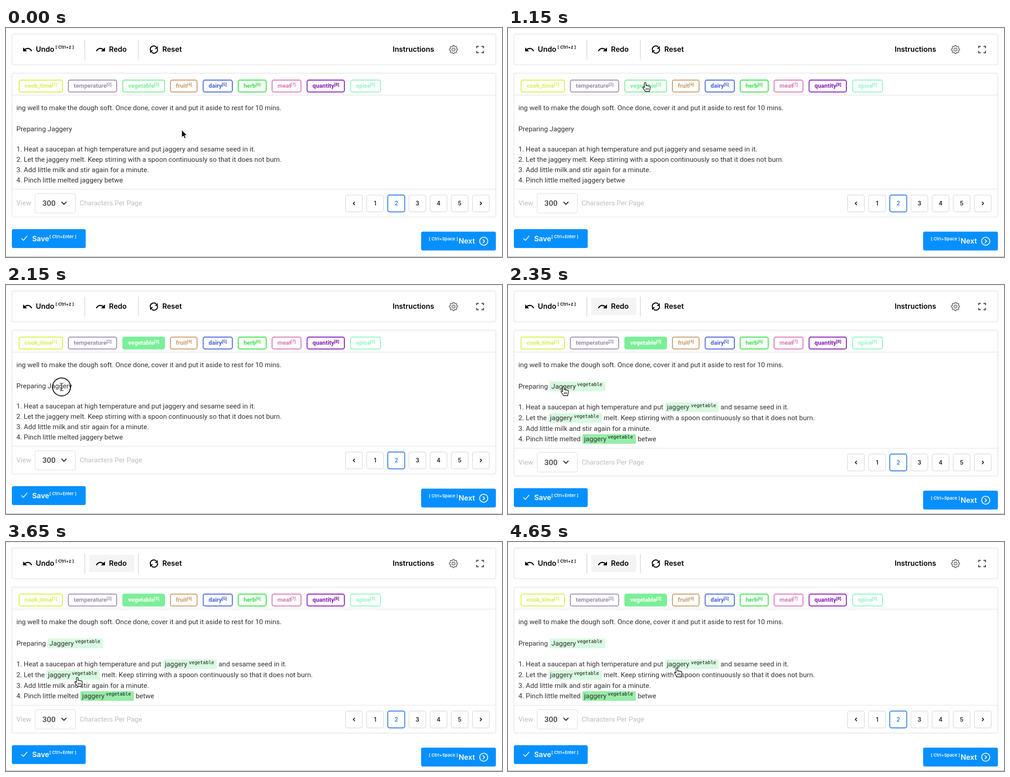
Write an HTML page that moves like this. It is 1098x510 px and loops after 4880 ms.

```html
<!DOCTYPE html>
<html lang="en">
<head>
<meta charset="utf-8">
<title>Text labelling</title>
<style>
  html, body { margin: 0; width: 100%; height: 100%; overflow: hidden; background: #fff; }
  svg { display: block; width: 1098px; height: 510px; }
  text { white-space: pre; }
  .ui { font: 600 15.9px Inter, sans-serif; }
  .key { font: 600 9.6px Inter, sans-serif; }
  .page { font: 600 12.5px Inter, sans-serif; text-anchor: middle; }
  .body { font: 400 15.21px Roboto, sans-serif; fill: #333; }
  .tag { font: 700 13.15px Roboto, sans-serif; }
  .index { font: 700 9.9px Roboto, sans-serif; }
  .mark { font: 400 10.3px "DejaVu Sans Mono", monospace; fill: #111; }
  .size { font: 500 17.2px Roboto, sans-serif; fill: #444; }
  .muted { fill: #bdbdbd; }
  .frame { fill: none; stroke: #d9d9d9; }
  .line { fill: none; stroke-linecap: round; stroke-linejoin: round; }
</style>
</head>
<body>
<svg id="stage" viewBox="0 0 1098 510">
  <path d="M0 .5H1098" stroke="#e6e6e6"/>
  <path d="M0 509.5H1098" stroke="#a8a8a8"/>

  <g id="toolbar">
    <rect class="frame" x="13" y="13.5" width="1071.5" height="68.5" rx="3"/>
    <rect id="redoBg" x="184" y="28.5" width="100" height="38.5" rx="4" fill="#f4f4f4"/>
    <path d="M174.5 26V70M293 26V70" stroke="#c4c4c4"/>
    <path id="undoIcon" transform="translate(36 36.5) scale(.97)" d="M12.5 8c-2.65 0-5.05.99-6.9 2.6L2 7v9h9l-3.62-3.62c1.39-1.16 3.16-1.88 5.12-1.88 3.54 0 6.55 2.31 7.6 5.5l2.37-.78C21.08 11.03 17.15 8 12.5 8z"/>
    <use href="#undoIcon" transform="translate(257 0) scale(-1 1)"/>
    <g id="resetIcon">
      <path id="halfLoop" d="M319.6 49.5A7.8 7.8 0 0 1 332.6 42.2" fill="none" stroke="#000" stroke-width="2.2"/>
      <path id="loopTip" d="M335.8 40V46.6H329.2z"/>
      <use href="#halfLoop" transform="rotate(180 327.4 48)"/>
      <use href="#loopTip" transform="rotate(180 327.4 48)"/>
    </g>
    <g id="gear" class="line" stroke="#6a6a6a" stroke-width="1.6">
      <path id="gearEdge"/>
      <circle cx="990.6" cy="48" r="3.3"/>
    </g>
    <path d="M1042 45V41H1046.5M1052.5 41H1057V45M1057 51V55H1052.5M1046.5 55H1042V51" fill="none" stroke="#555" stroke-width="2.3"/>
    <text class="ui" x="66" y="53.3">Undo</text>
    <text class="key" x="109.5" y="46.2">[ Ctrl+z ]</text>
    <text class="ui" x="228" y="53.3">Redo</text>
    <text class="ui" x="346" y="53.3">Reset</text>
    <text class="ui" x="856" y="53.3">Instructions</text>
  </g>

  <rect id="panel" class="frame" x="13" y="100.5" width="1071.5" height="320.5" rx="3"/>
  <path d="M13 149.5H1084" stroke="#e0e0e0"/>
  <g id="tags"></g>
  <g id="plain"></g>
  <g id="marked"></g>

  <g id="footer">
    <path d="M13 359H1084" stroke="#e0e0e0"/>
    <text class="body muted" style="fill:#bdbdbd" x="23" y="395.4">View</text>
    <rect class="frame" x="64.5" y="369" width="89" height="43" rx="3"/>
    <text class="size" x="80.5" y="396">300</text>
    <path class="line" d="M123.5 387.8L128.3 392.6 133.1 387.8" stroke="#444" stroke-width="2.5"/>
    <text class="body muted" style="fill:#bdbdbd" x="163" y="395.4">Characters Per Page</text>
    <g id="pages"></g>
    <g fill="#fff">
      <rect x="13" y="448" width="163.5" height="42" rx="4" fill="#0690ff"/>
      <path class="line" d="M34.5 469L38.5 473 46.5 463.5" stroke="#fff" stroke-width="1.7"/>
      <text class="ui" x="58" y="474.7">Save</text>
      <text class="key" x="96" y="467.8">[ Ctrl+Enter ]</text>
      <rect x="919" y="453.5" width="165.5" height="42" rx="4" fill="#0690ff"/>
      <text class="key" x="936" y="473.3">[ Ctrl+Space ]</text>
      <text class="ui" x="1002" y="480.2">Next</text>
      <g class="line" stroke="#fff" stroke-width="1.8">
        <circle cx="1057.5" cy="474.8" r="9"/>
        <path d="M1056 471.3L1059.5 474.8 1056 478.3"/>
      </g>
    </g>
  </g>

  <g id="cursor">
    <circle id="ring" r="20" fill="none" stroke="#111" stroke-width="1.9"/>
    <path id="arrow" d="M0 0V16.5L3.8 13 6.3 19 9 17.9 6.5 12H11.5z" fill="#000" stroke="#fff"/>
    <g id="beam" fill="none" stroke-linecap="round">
      <path d="M-3.5-8.5Q0-8.5 0-6Q0-8.5 3.5-8.5M0-6V6M-3.5 8.5Q0 8.5 0 6Q0 8.5 3.5 8.5M-2 3H2" stroke="#fff" stroke-width="2.6" opacity=".7"/>
      <path d="M-3.5-8.5Q0-8.5 0-6Q0-8.5 3.5-8.5M0-6V6M-3.5 8.5Q0 8.5 0 6Q0 8.5 3.5 8.5M-2 3H2" stroke="#111" stroke-width="1.2"/>
    </g>
    <g id="hand" stroke="#111" stroke-width="1.3" stroke-linejoin="round">
      <path d="M-2.1 10.8V1.1a1.8 1.8 0 0 1 3.6 0V6.6a1.8 1.5 0 0 1 3.4.6a1.7 1.5 0 0 1 3.2.7a1.5 1.4 0 0 1 2.6 1.2V13q0 2.2-1.4 4v2.5H.1q-.4-1.6-2.4-3.8T-5.6 10.4q-.1-1.6 1.3-1.4t2.2 1.8z" fill="#fff"/>
      <path d="M1.6 11.5v4.5m2.7-4.5v4.5m2.7-4.5v4.5" fill="none" stroke-width="1.1"/>
    </g>
  </g>
</svg>
<script>
const LOOP = 4880, PICK = 1300, APPLY = 2250, GROW = 4.5;
const $ = id => document.getElementById(id);

function add(parent, name, attrs, content) {
  const el = document.createElementNS("http://www.w3.org/2000/svg", name);
  for (const key in attrs) el.setAttribute(key, attrs[key]);
  if (content) el.textContent = content;
  return parent.appendChild(el);
}
const write = (parent, cls, x, y, content, attrs) =>
  add(parent, "text", { class: cls, x, y, ...attrs }, content);

// Label buttons: name, left, right, index offset, colour
const tags = [
  ["cook_time", 28, 126, 102, "#d3f24b"],
  ["temperature", 137, 246, 222.5, "#9c8fb0"],
  ["vegetable", 257.5, 352, 328, "#7bef98"],
  ["fruit", 363, 424, 400.5, "#c89b68"],
  ["dairy", 435.5, 502, 477.5, "#4463d8"],
  ["herb", 513, 577, 552.5, "#3ae04c"],
  ["meat", 588, 654, 630, "#d777b4"],
  ["quantity", 665.5, 750, 726.5, "#8219b5"],
  ["spice", 762, 830, 806, "#90f6c3"]
].map(([name, left, right, supX, color], i) => {
  const g = add($("tags"), "g", { fill: color });
  const box = add(g, "rect", { x: left + 1, y: 116, width: right - left - 2, height: 26.5, rx: 4, fill: "#fff", stroke: color, "stroke-width": 1.9 });
  write(g, "tag", left + 13, 133, name);
  write(g, "index", supX, 128.8, `[${i + 1}]`);
  return { g, box, color };
});

const plainLines = [
  [183.4, "ing well to make the dough soft. Once done, cover it and put it aside to rest for 10 mins."],
  [229.5, "Preparing Jaggery"],
  [275.4, "1. Heat a saucepan at high temperature and put jaggery and sesame seed in it."],
  [298.1, "2. Let the jaggery melt. Keep stirring with a spoon continuously so that it does not burn."],
  [320.9, "3. Add little milk and stir again for a minute."],
  [343.7, "4. Pinch little melted jaggery betwe"]
];
for (const [y, s] of plainLines) write($("plain"), "body", 23, y, s);

function mark(x, y, width, word, supX, fill = "#d8fae0") {
  const box = add($("marked"), "rect", { x, y: y - 15.8, width, height: 21.5, rx: 3, fill });
  write($("marked"), "body", x + 3.7, y, word);
  write($("marked"), "mark", supX, y - 5.8, "vegetable");
  return box;
}
const marks = [
  mark(92.3, 230.8, 122.7, "Jaggery", 153),
  mark(348, 277.4, 118.4, "jaggery", 405),
  mark(89.4, 301.4, 118.3, "jaggery", 145.7),
  mark(164.7, 348.1, 118.3, "jaggery", 220.8, "#98eca9")
];
[
  [23, 183.4, plainLines[0][1]],
  [23, 230.8, "Preparing"],
  [23, 277.4, "1. Heat a saucepan at high temperature and put"],
  [470.5, 277.4, "and sesame seed in it."],
  [23, 301.4, "2. Let the"],
  [211.7, 301.4, "melt. Keep stirring with a spoon continuously so that it does not burn."],
  [23, 324.5, plainLines[4][1]],
  [23, 348.1, "4. Pinch little melted"],
  [287, 348.1, "betwe"]
].forEach(([x, y, s]) => write($("marked"), "body", x, y, s));

for (let i = 0; i < 7; i++) {
  const x = 751.5 + i * 46.83, mid = x + 18.8, on = i === 2;
  add($("pages"), "rect", { class: "frame", x, y: 372, width: 37.5, height: 37.5, rx: 4,
    style: on ? "stroke:#2f7fe6;stroke-width:1.9" : "stroke:#cfcfcf" });
  if (i % 6) write($("pages"), "page", mid, 395.2, String(i), { fill: on ? "#2f7fe6" : "#222" });
  else {
    const d = i ? 3 : -3;
    add($("pages"), "path", { class: "line", d: `M${mid - d / 2} 387.6l${d} 3.1l${-d} 3.1`, stroke: "#111", "stroke-width": 1.8 });
  }
}

// Eight teeth, four corners each
const corners = [[-15, 7.2], [-9, 9.2], [9, 9.2], [15, 7.2]];
let edge = "";
for (let i = 0; i < 32; i++) {
  const [turn, r] = corners[i % 4], a = ((i >> 2) * 45 + turn) * Math.PI / 180;
  edge += `${i ? "L" : "M"}${990.6 + r * Math.sin(a)} ${48 - r * Math.cos(a)}`;
}
$("gearEdge").setAttribute("d", edge + "z");

// Pointer moves: start, end, target
const start = [389, 227];
const moves = [
  [560, 1120, [304, 122]],
  [1420, 2060, [123, 227]],
  [3000, 3420, [158, 302]],
  [4000, 4580, [374, 281]]
];
const clicks = [[1200, 1400], [2100, APPLY]];
const ease = p => p * p * (3 - 2 * p);

function pointerAt(t) {
  let [x, y] = start;
  for (const [from, to, [tx, ty]] of moves) {
    const p = ease(Math.min(1, Math.max(0, (t - from) / (to - from))));
    x += (tx - x) * p;
    y += (ty - y) * p;
  }
  return [x, y];
}

const show = (el, on) => el.setAttribute("visibility", on ? "visible" : "hidden");
const over = (el, x, y) => {
  const b = el.getBBox();
  return x >= b.x && x <= b.x + b.width && y >= b.y && y <= b.y + b.height;
};

function render(t) {
  const picked = t >= PICK, applied = t >= APPLY;
  const [x, y] = pointerAt(t);
  const veg = tags[2];
  veg.box.setAttribute("fill", picked ? veg.color : "#fff");
  veg.g.setAttribute("fill", picked ? "#fff" : veg.color);

  show($("plain"), !applied);
  show($("marked"), applied);
  show($("redoBg"), applied);
  $("footer").setAttribute("transform", `translate(0 ${applied ? GROW : 0})`);
  $("panel").setAttribute("height", 320.5 + (applied ? GROW : 0));

  const links = tags.map(tag => tag.box).concat(applied ? marks : []);
  const words = [...$(applied ? "marked" : "plain").querySelectorAll("text")];
  const hit = el => over(el, x, y);
  const shape = links.some(hit) ? "hand" : words.some(hit) ? "beam" : "arrow";
  for (const id of ["hand", "beam", "arrow"]) show($(id), id === shape);
  show($("ring"), clicks.some(([from, to]) => t >= from && t < to));
  $("cursor").setAttribute("transform", `translate(${x} ${y})`);
}

const began = performance.now();
function tick() {
  render((performance.now() - began) % LOOP);
  requestAnimationFrame(tick);
}
tick();
</script>
</body>
</html>
```
